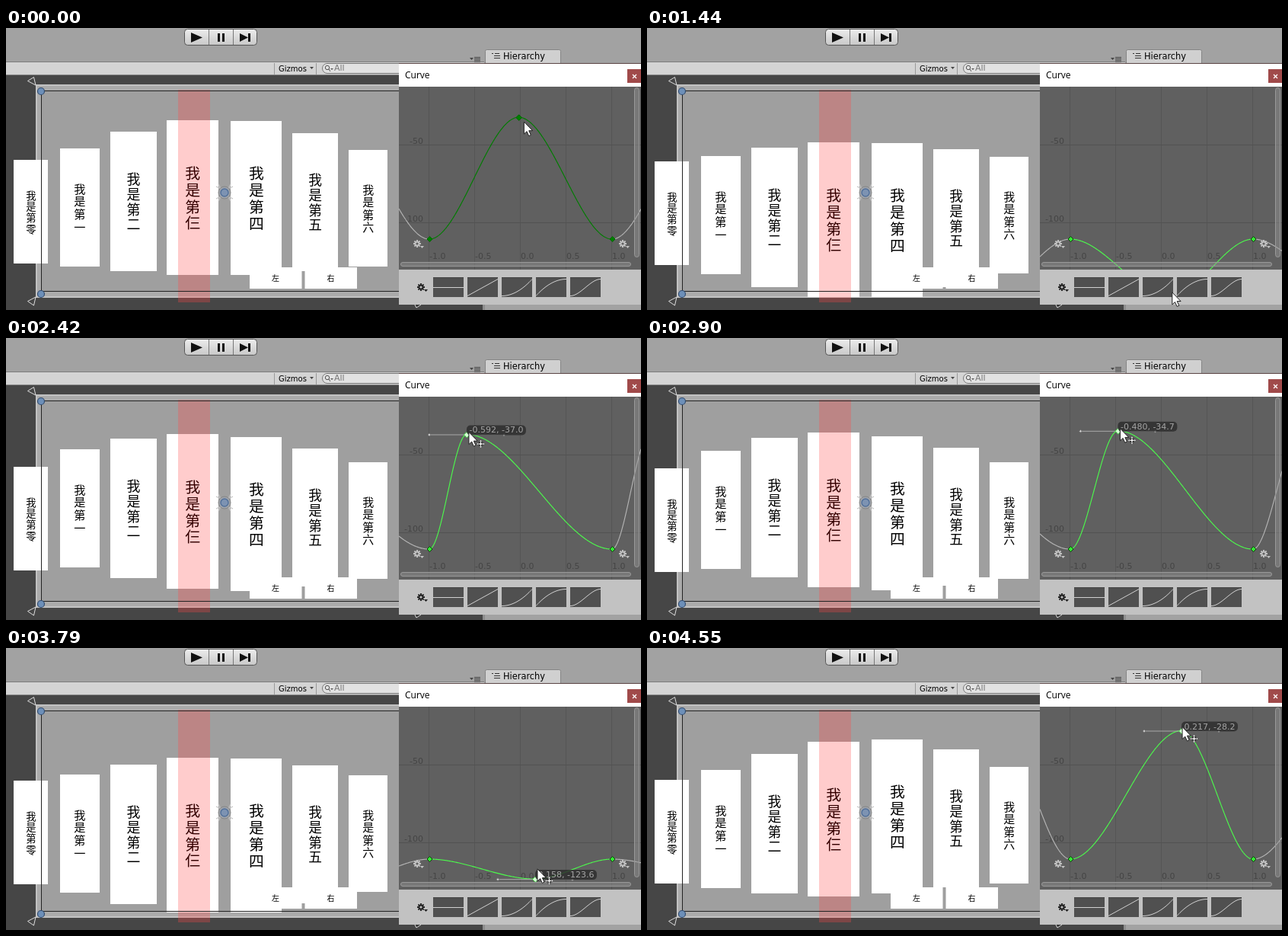
An HTML page with a canvas that plays this animation: 834 px wide and 370 px high, repeating every 4.65 s.

```html
<!DOCTYPE html>
<html lang="zh">
<head>
<meta charset="utf-8">
<title>Curve editor</title>
<style>
html, body { margin: 0; width: 100%; height: 100%; overflow: hidden; background: #a2a2a2; }
canvas { display: block; width: 834px; height: 370px; }
</style>
</head>
<body>
<canvas id="stage" width="834" height="370"></canvas>
<script>
const g = document.getElementById('stage').getContext('2d');
const LOOP = 4650, STEP = 75, DRAG_START = 490, END_VALUE = -110.8;
const UI = '"DejaVu Sans", sans-serif';
const CJK = '"Noto Sans CJK SC", "Noto Sans CJK", sans-serif';

// Key position (t, v) and pointer offset (dx, dy); each move changes some of them in equal steps
const rest = { t: -.022, v: -32.4, dx: 7, dy: 6 };
const moves = [
  { at: 70, steps: 4, dx: 3, dy: -3 },
  { at: DRAG_START, steps: 7, t: .0345, v: -135, dy: 6 },
  { at: 1040, steps: 5, t: .09, v: -148, dy: -6 },
  { at: 1520, steps: 5, t: .03, v: -25.5, dy: -3 },
  { at: 2010, steps: 6, t: -.592, v: -37 },
  { at: 2590, steps: 3, t: -.65, v: -38 },
  { at: 2900, steps: 6, t: .008, v: -25.3 },
  { at: 3550, steps: 7, t: .2, v: -151, dy: -16 },
  { at: 4250, steps: 5, t: .217, v: -28.2, dx: 1, dy: -5 }
];

const plotX = t => 676 + 120 * t;
const plotY = v => 153 - (v + 50) * 2.04;
const smooth = u => u * u * (3 - 2 * u);
const easeOut = u => Math.sin(u * Math.PI / 2);

function curve(t, key) {
  t = ((t + 1) % 2 + 2) % 2 - 1;
  const u = t < key.t ? (t + 1) / (key.t + 1) : (1 - t) / (1 - key.t);
  return END_VALUE + (key.v - END_VALUE) * smooth(u);
}

function pose(ms) {
  const p = { ...rest };
  for (const move of moves) {
    if (ms < move.at) break;
    const done = Math.min(move.steps, Math.floor((ms - move.at) / STEP) + 1) / move.steps;
    for (const k in rest) if (k in move) p[k] += (move[k] - p[k]) * easeOut(done);
  }
  const x = plotX(p.t), y = plotY(p.v);
  return { t: p.t, v: p.v, x, y, px: x + p.dx, py: y + p.dy, drag: ms >= DRAG_START };
}

function rect(x, y, w, h, fill) { g.fillStyle = fill; g.fillRect(x, y, w, h); }

function paint(fill, stroke, width = 1) {
  if (fill) { g.fillStyle = fill; g.fill(); }
  if (stroke) { g.strokeStyle = stroke; g.lineWidth = width; g.stroke(); }
}

function shape(points, fill, stroke, closed = true, width = 1) {
  g.beginPath();
  points.forEach(([x, y]) => g.lineTo(x, y));
  if (closed) g.closePath();
  paint(fill, stroke, width);
}

function round(x, y, w, h, r, fill, stroke) {
  g.beginPath(); g.roundRect(x, y, w, h, r); paint(fill, stroke);
}

function circle(x, y, r, fill, stroke, width) {
  g.beginPath(); g.arc(x, y, r, 0, Math.PI * 2); paint(fill, stroke, width);
}

function line(x1, y1, x2, y2, color, width) { shape([[x1, y1], [x2, y2]], null, color, false, width); }

function text(s, x, y, size, color, family = UI, align = 'left', base = 'alphabetic') {
  g.font = `${size}px ${family}`;
  g.textAlign = align; g.textBaseline = base; g.fillStyle = color;
  g.fillText(s, x, y);
}

function diamond(x, y, r, fill, stroke) {
  shape([[x, y - r], [x + r, y], [x, y + r], [x - r, y]], fill, stroke);
}

function clipped(x, y, w, h, draw) {
  g.save(); g.beginPath(); g.rect(x, y, w, h); g.clip(); draw(); g.restore();
}

function gear(x, y, color, hole) {
  for (let i = 0; i < 4; i++) {
    const a = i * Math.PI / 4, c = 5 * Math.cos(a), s = 5 * Math.sin(a);
    line(x - c, y - s, x + c, y + s, color, 2);
  }
  circle(x, y, 3.3, color);
  circle(x, y, 1.6, hole);
  shape([[x + 4, y + 3], [x + 9, y + 3], [x + 6.5, y + 6]], color);
}

function toolbar() {
  rect(0, 0, 834, 370, '#a2a2a2');
  rect(0, 45, 628, 17, '#d4d4d4');
  rect(0, 44, 628, 1, '#7c7c7c');
  rect(0, 61, 628, 1, '#888');
  const shade = g.createLinearGradient(0, 2, 0, 22);
  shade.addColorStop(0, '#ececec');
  shade.addColorStop(1, '#c9c9c9');
  round(234.5, 1.5, 95, 21, 4, shade, '#555');
  line(266.5, 2, 266.5, 22, '#777');
  line(298.5, 2, 298.5, 22, '#777');
  shape([[243, 6], [258, 12.5], [243, 19]], '#111');
  rect(278, 7, 3, 11, '#111');
  rect(284, 7, 3, 11, '#111');
  shape([[307, 7], [318, 12.5], [307, 18]], '#111');
  rect(318, 7, 3, 11, '#111');

  line(352.5, 46, 352.5, 61, '#999');
  line(407.5, 46, 407.5, 61, '#999');
  text('Gizmos', 358, 57, 10, '#000');
  shape([[399, 51], [404, 51], [401.5, 54]], '#444');
  round(415.5, 46.5, 210, 13, 6.5, '#e2e2e2', '#777');
  circle(422, 52, 2.7, null, '#555');
  line(424, 54, 426, 57, '#555');
  shape([[426, 53], [430, 53], [428, 55]], '#555');
  text('All', 431, 56, 11, '#777');

  shape([[609, 39], [614, 39], [611.5, 42]], '#444');
  for (let y = 38.5; y < 45; y += 2) line(615, y, 623, y, '#444');
  round(629.5, 28.5, 99, 30, 2, '#d0d0d0', '#858585');
  for (let i = 0; i < 3; i++) {
    rect(638 + (i ? 3 : 0), 33 + i * 3, 2, 1, '#333');
    rect(642 + (i ? 1 : 0), 33 + i * 3, 6, 1, '#333');
  }
  text('Hierarchy', 653, 41, 11.4, '#000');
}

// The cards shrink and crowd together away from the middle; the curve lifts them
function cards(key) {
  [...'零一二仨四五六'].forEach((digit, i) => {
    const d = i - 3.45;
    const x = 283 + 86 * d / (1 + .054 * Math.abs(d));
    const h = Math.round(169 + 36 * Math.cos(.8 * d)), w = Math.round(h / 3);
    const y = 213.2 - .262 * curve(d / 4, key);
    const top = Math.round(y - h / 2);
    rect(Math.round(x - w / 2), top, w, h, '#fff');
    [...'我是第' + digit].forEach((c, k) =>
      text(c, x, top + h / 2 + .5 + (k - 1.5) * h * .108, h * .098, '#000', CJK, 'center', 'middle'));
  });
  for (const [x, label] of [[320, '左'], [392.5, '右']]) {
    rect(x, 314, 68.5, 28, '#fff');
    text(label, x + 34, 328, 10, '#000', CJK, 'center', 'middle');
  }
}

function scene(key) {
  rect(0, 62, 626, 308, '#464646');
  rect(626, 62, 3, 308, '#8e8e8e');
  rect(39, 74, 500, 280, '#c2c2c2');
  rect(41, 76, 496, 276, '#ababab');
  rect(46, 82, 488, 264, '#9f9f9f');
  rect(226, 81, 42, 279, 'rgba(255,210,210,.12)');
  cards(key);
  rect(226, 81, 42, 279, 'rgba(255,0,0,.2)');
  g.strokeStyle = '#222'; g.lineWidth = 1;
  g.strokeRect(46.5, 82.5, 488, 263);
  line(46.5, 346, 46.5, 349, '#222');
  for (const y of [83, 349]) circle(46, y, 4.5, '#6d8fb8', '#334d70', 1.2);
  shape([[28.5, 69.5], [36.5, 64.5], [39, 75]], '#464646', '#ddd');
  shape([[28.5, 358.5], [39, 353], [36.5, 364]], '#464646', '#ddd');
  shape([[535, 359], [545, 363], [539, 367]], '#333', '#ddd');

  for (const [sx, sy] of [[-1, -1], [1, -1], [1, 1], [-1, 1]]) {
    shape([[287 + sx * 11, 216 + sy * 8], [287 + sx * 5, 216 + sy * 5], [287 + sx * 8, 216 + sy * 11]],
      null, '#c4c4c4', false, 1.2);
  }
  circle(287, 216, 8, '#a0a4aa', '#858585');
  circle(287, 216, 5, '#7d93b2', '#52709a', 1.5);
}

function curveLine(from, to, key, color) {
  const points = [];
  for (let x = from; x <= to; x++) points.push([x, plotY(curve((x - 676) / 120, key))]);
  shape(points, null, color, false, 1.15);
}

function plot(key) {
  rect(516, 77, 318, 240, '#606060');
  for (let i = 0; i < 5; i++) {
    const x = 555.5 + i * 60;
    line(x, 77, x, 317, '#555');
    text((i / 2 - 1).toFixed(1), x + .5, 303, 11, '#454545');
  }
  for (const v of [-50, -100]) {
    const y = plotY(v) + .5;
    line(516, y, 834, y, '#525252');
    text(v, 548, y - 1.5, 11, '#454545', UI, 'right');
  }

  clipped(516, 77, 318, 240, () => {
    curveLine(516, 556, key, '#b4b4b4');
    curveLine(796, 834, key, '#b4b4b4');
    curveLine(556, 796, key, key.drag ? '#4cf84c' : '#007c00');
    const fill = key.drag ? '#35e835' : '#008000';
    const edge = key.drag ? '#0a420a' : '#006800';
    for (const t of [-1, 1]) diamond(plotX(t) + .5, plotY(END_VALUE), 3.5, fill, edge);
    if (key.drag) {
      const y = key.y + .5;
      line(key.x - 49, y, key.x + 49, y, '#a9a9a9');
      for (const side of [-49, 49]) diamond(key.x + side, y, 1.8, '#ddd', '#777');
    }
    diamond(key.x + .3, key.y + .5, 3.8, key.drag ? '#d5ffd5' : fill, key.drag ? '#4c4' : edge);
  });
  for (const x of [540, 810]) gear(x, 283, '#c2c2c2', '#606060');
  round(825.5, 78.5, 6, 222, 3, 'rgba(150,150,150,.45)', '#999');
  round(518.5, 307.5, 302, 5, 2.5, 'rgba(150,150,150,.45)', '#999');
}

function curveWindow(key) {
  rect(516, 46, 318, 317, '#c2c2c2');
  rect(516, 46, 318, 1, '#5a4444');
  rect(516, 47, 318, 30, '#fff');
  text('Curve', 524, 66, 12, '#000', '"Open Sans", sans-serif');
  rect(816, 54, 18, 18, '#a04a4a');
  line(823, 61, 828, 66, '#fff', 1.3);
  line(828, 61, 823, 66, '#fff', 1.3);
  plot(key);
  gear(545, 340, '#222', '#c2c2c2');
  const presets = [() => .5, u => u, u => u * u, u => 1 - (1 - u) ** 2, smooth];
  presets.forEach((f, i) => {
    const x = 561 + i * 45;
    rect(x, 328, 40, 25, '#505050');
    rect(x, 327, 40, 1, '#444');
    const points = [];
    for (let k = 0; k <= 40; k++) points.push([x + k, 351.5 - 22 * f(k / 40)]);
    shape(points, null, '#d0d0d0', false);
  });
}

function tooltip(key) {
  clipped(516, 77, 318, 241, () => {
    const label = `${key.t.toFixed(3)}, ${key.v.toFixed(1)}`;
    g.font = `11px ${UI}`;
    round(key.x, key.y - 12, g.measureText(label).width + 7, 13, 5, 'rgba(45,45,45,.82)');
    text(label, key.x + 3.5, key.y - 2, 11, '#a5a5a5');
  });
}

function pointer(key) {
  const arrow = [[0, 0], [0, 16], [3.7, 12.6], [6.3, 18.5], [9, 17.3], [6.4, 11.6], [11.3, 11.6]];
  shape(arrow.map(([x, y]) => [key.px + x, key.py + y]), '#fff', '#222');
  if (!key.drag || key.py > 317) return;
  const x = key.px + 15.5, y = key.py + 15.5;
  for (const [color, width] of [['#222', 3.4], ['#fff', 1.3]]) {
    line(x - 4, y, x + 4, y, color, width);
    line(x, y - 4, x, y + 4, color, width);
  }
  for (const [dx, dy] of [[1, 0], [-1, 0], [0, 1], [0, -1]]) {
    const cx = x + dx * 3, cy = y + dy * 3;
    shape([[cx + dx * 2.5, cy + dy * 2.5], [cx + dy * 2, cy + dx * 2], [cx - dy * 2, cy - dx * 2]], '#fff', '#222', true, .5);
  }
}

const origin = performance.now();
function frame() {
  const key = pose((performance.now() - origin) % LOOP);
  toolbar();
  scene(key);
  curveWindow(key);
  if (key.drag) tooltip(key);
  pointer(key);
  requestAnimationFrame(frame);
}
frame();
</script>
</body>
</html>
```
